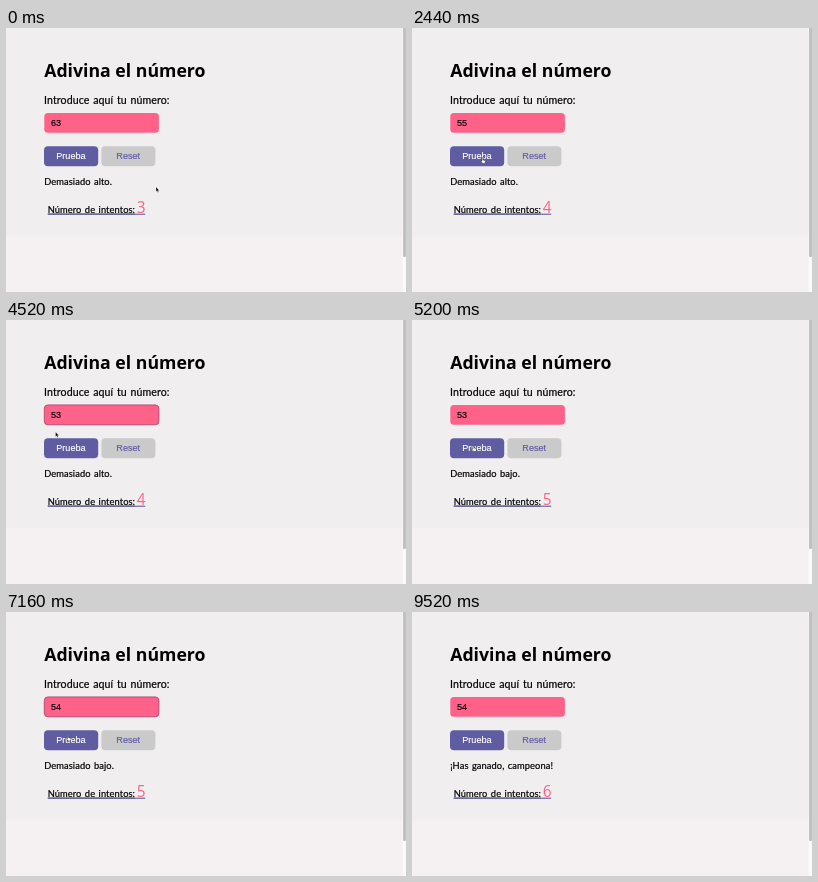
An HTML page that plays this animation: 400 by 264 pixels, repeating every 9560 ms.

```html
<!DOCTYPE html>
<html lang="es">
<head>
<meta charset="utf-8">
<title>Adivina el número</title>
<style>
  html, body { margin: 0; width: 100%; height: 100%; overflow: hidden; background: #f5f0f1; }
  svg { display: block; width: 100%; height: 100%; }
  .title { font: 700 17.7px "Open Sans", sans-serif; }
  .text { font-family: Lato, sans-serif; font-size: 9.3px; word-spacing: .1em; letter-spacing: .01em; stroke: #000; stroke-width: .2px; }
  .count { font: 15.4px "Open Sans", sans-serif; fill: #ff6289; }
  .ui { font-family: "Liberation Sans", Arial, sans-serif; font-size: 9.1px; stroke-width: .15px; }
</style>
</head>
<body>
<svg viewBox="0 0 400 264">
  <rect width="400" height="264" fill="#f5f0f1"/>
  <rect width="397" height="207.5" fill="#f0eeef"/>
  <rect x="396.5" width="3.5" height="264" fill="#fafafa"/>
  <rect x="397" y="-3" width="3" height="232" rx="1" fill="#c1c1c1"/>

  <text class="title" x="38.2" y="49.4">Adivina el número</text>
  <g class="text">
    <text x="38" y="76" style="font-size:10.6px">Introduce aquí tu número:</text>
    <text id="message" x="38.2" y="156.6"></text>
    <text x="41.7" y="185">Número de intentos:</text>
  </g>
  <text id="count" class="count" x="130.7" y="185.2"></text>
  <rect x="41.7" y="185.7" width="97.5" height="1" fill="#5450a0"/>
  <rect x="41.7" y="185.7" width="87" height=".5" fill="#16142c"/>

  <rect id="field" x="38.3" y="84.9" width="114.6" height="19.9" rx="3.6" fill="#ff6289" stroke-width=".8"/>
  <rect id="mark" x="44.4" y="90.2" width="11.4" height="9.8" fill="#d9668a"/>
  <text id="value" class="ui" x="44.9" y="98" stroke="#000"></text>

  <rect x="38" y="118.2" width="54.2" height="20" rx="4" fill="#605ca2"/>
  <text class="ui" x="64.9" y="131.2" text-anchor="middle" fill="#fff" stroke="#fff">Prueba</text>
  <rect x="95.4" y="118.2" width="54" height="20" rx="4" fill="#cacaca"/>
  <text class="ui" x="122.2" y="131.2" text-anchor="middle" fill="#5f5aa8" stroke="#5f5aa8">Reset</text>

  <g id="cursor">
    <path id="arrow" d="M0 0V4.6L1.1 3.7L1.9 5.4L2.7 5L1.9 3.4H3.3Z" fill="#000" stroke="#fff" stroke-width=".3"/>
    <path id="beam" d="M-1 -2.6Q0 -2.6 0 -2V2Q0 2.6 -1 2.6M1 -2.6Q0 -2.6 0 -2V2Q0 2.6 1 2.6" fill="none" stroke="#555" stroke-width=".5"/>
    <path id="hand" d="M0 0Q.7 -.6 1.1 .2V2L3.1 2.5Q3.6 2.8 3.4 3.8L2.8 5.4H.6L-1 3.2Q-.9 2.5 0 3Z" fill="#fff" stroke="#222" stroke-width=".5"/>
  </g>
</svg>
<script>
const LOOP = 9560;
const $ = id => document.getElementById(id);

// Pointer stops: time, x, y
const stops = [
  [0, 150, 159], [120, 150, 159], [480, 60, 96], [560, 60, 96], [860, 26, 97], [1400, 27, 98],
  [2040, 70, 130], [2560, 70, 130], [2960, 58, 95], [3040, 58, 95], [3360, 37, 97], [4200, 38, 98],
  [4840, 61, 126], [5400, 61, 126], [5820, 58, 95], [5900, 58, 95], [6160, 36, 96], [6360, 23, 97],
  [6800, 25, 98], [7320, 72, 131], [7880, 72, 131], [8560, 376, 199], [9000, 384, 178]
];

// Each round: focus, selection, first key, second key, click
const rounds = [
  { focus: 560, select: 760, keys: [1280, 1480], click: 2200, value: "55", message: "Demasiado alto." },
  { focus: 3040, select: 3240, keys: [4000, 4240], click: 5000, value: "53", message: "Demasiado bajo." },
  { focus: 5900, select: 6060, keys: [6640, 6840], click: 7440, value: "54", message: "¡Has ganado, campeona!" }
];

const show = (id, on) => $(id).setAttribute("visibility", on ? "visible" : "hidden");
const ease = u => u * u * (3 - 2 * u);
const inside = (x, y, l, t, r, b) => x >= l && x <= r && y >= t && y <= b;

function pointerAt(t) {
  const i = stops.findIndex(s => s[0] > t);
  if (i < 0) return stops[stops.length - 1].slice(1);
  const [t0, x0, y0] = stops[i - 1], [t1, x1, y1] = stops[i];
  const u = ease((t - t0) / (t1 - t0));
  return [x0 + (x1 - x0) * u, y0 + (y1 - y0) * u];
}

function stateAt(t) {
  const s = { value: "63", message: "Demasiado alto.", count: 3, focus: false, marked: false };
  for (const r of rounds) {
    if (t < r.focus) break;
    const typed = r.keys.filter(k => t >= k).length;
    s.focus = t < r.click;
    s.marked = t >= r.select && !typed;
    if (typed) s.value = r.value.slice(0, typed);
    if (t >= r.click) {
      s.message = r.message;
      s.count++;
    }
  }
  return s;
}

function draw(t) {
  const s = stateAt(t);
  $("value").textContent = s.value;
  $("message").textContent = s.message;
  $("count").textContent = s.count;
  $("field").setAttribute("stroke", s.focus ? "#a83c6c" : "none");
  show("mark", s.marked);

  const [x, y] = pointerAt(t);
  const visible = t < 9000;
  const onButton = inside(x, y, 38, 118, 150, 139);
  const onField = inside(x, y, 38, 85, 153, 105) || (s.marked && t > 6060 && x < 38);
  $("cursor").setAttribute("transform", `translate(${x} ${y})`);
  show("hand", visible && onButton);
  show("beam", visible && onField);
  show("arrow", visible && !onButton && !onField);
}

function tick() {
  draw(performance.now() % LOOP);
  requestAnimationFrame(tick);
}
tick();
</script>
</body>
</html>
```
